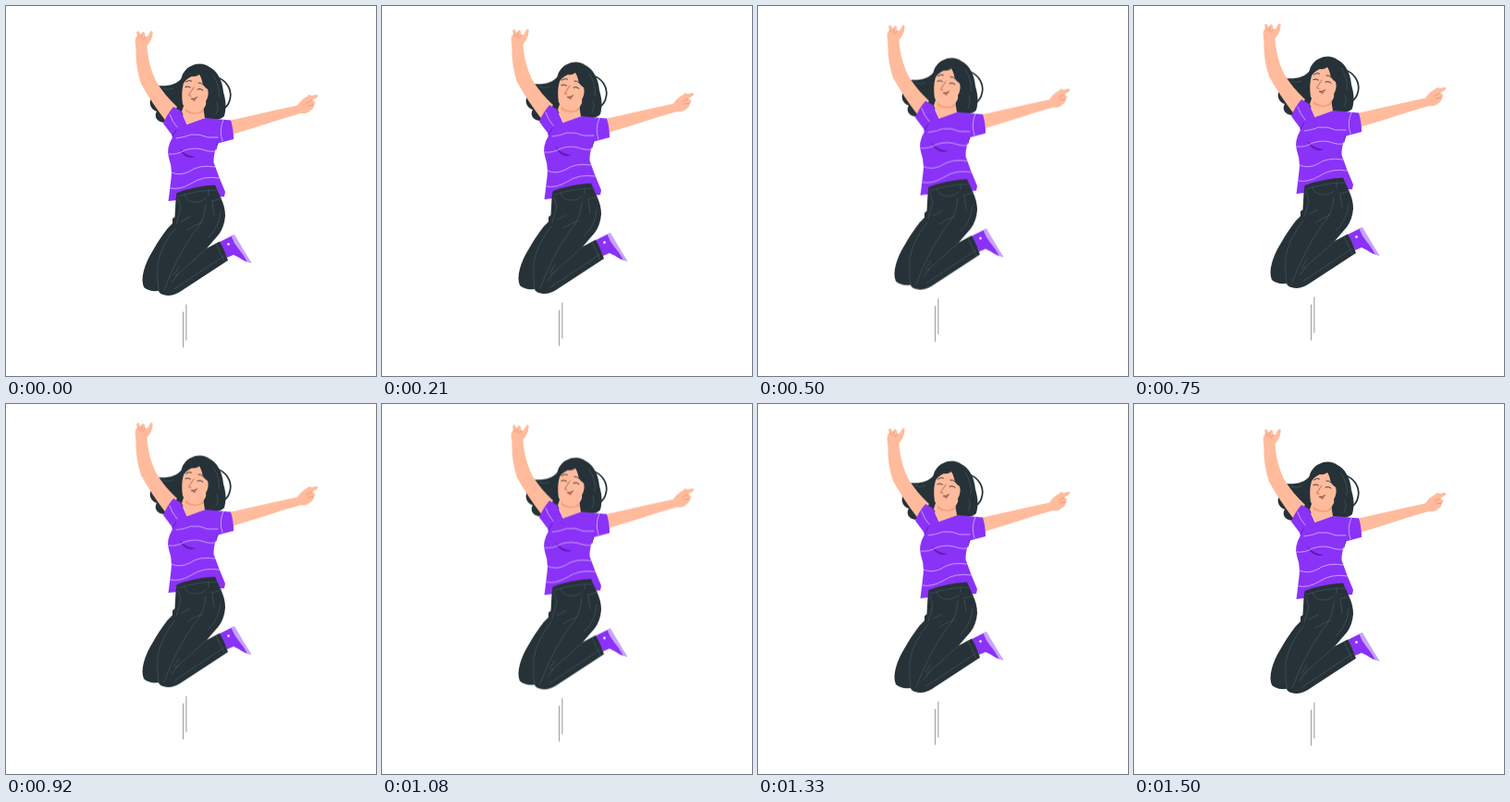
Animation of 400 by 400 pixels, one loop 1540 ms. Source, as an HTML page:

```html
<!DOCTYPE html>
<html lang="en">
<head>
<meta charset="utf-8">
<title>Jumping for joy</title>
<style>
  html, body { margin: 0; width: 100%; height: 100%; overflow: hidden; background: #fff; }
  svg { display: block; width: 100%; height: 100%; }
  .jump { animation: float 770ms cubic-bezier(.364, 0, .636, 1) -40ms infinite alternate; }
  @keyframes float { to { transform: translateY(-8px); } }
  .skin { fill: #ffbb9c; }
  .dark { fill: #263238; }
  .top { fill: #8a32f8; }
  .line { fill: none; stroke-linecap: round; stroke-linejoin: round; }
  .stripe { stroke: #e3cfff; stroke-width: .7; }
  .seam { stroke: #4b5d66; stroke-width: .6; }
  .fold { stroke: #5b1cad; stroke-width: .9; }
  .crease { stroke: #e88d72; stroke-width: .7; }
  .ink { stroke: #263238; stroke-width: .9; }
  .strand { stroke: #263238; stroke-width: 1.7; }
  .speed { stroke: #263238; stroke-width: .5; }
</style>
</head>
<body>
<svg viewBox="0 0 400 400">
  <g class="jump">
    <path class="line speed" d="M191.600 331V369M194.900 323V361"/>

    <!-- hair behind -->
    <path class="dark" d="M190 78C184 85 176 87 163 86C167 91 164 99 157 100C154 104 156 112 163 114C160 118 162 125 170 126L190 118L214 121C222 124 232 124 236 119C239 108 237 100 235 93C234 80 228 70 220 66C215 62 207 61 200 65C194 68 192 73 190 78Z"/>
    <path class="line strand" d="M228 77C238 80 244 90 242.500 99C241.500 105 239 109 235 111"/>

    <!-- shoe -->
    <path class="top" d="M231 255L246 247.500L265 277.500Q258 276.500 252 272L246 269L239 272Z"/>
    <path fill="#c9a3ff" d="M243.500 248.800L247 247L265.300 278L261 276.800Q257 269 251 262Q246 256 243.500 248.800Z"/>
    <circle cx="240.500" cy="257.500" r="1.300" fill="#fff"/>

    <!-- raised arm -->
    <path class="skin" d="M140.500 48L139.800 40Q139 35 142 32L141 29Q141.400 26.800 143.500 27.300L145.500 31L147 28.500Q149.600 27 150.200 30L150.500 33L153 33L156 27.500Q158.800 25.800 158.700 29Q158 37 152.500 43L153 50Q155 66 162 81Q171 96 185 109L174 126Q157 104 146 84Q140 66 140.500 48Z"/>
    <path class="line crease" d="M142.500 32l2 3M146 31l.8 4M150.500 33.500l-2.500 3"/>

    <!-- stretched arm -->
    <path class="skin" d="M241 124L292 112.500L315 107.500Q319 101 326 97.500Q328 95 330 97L336 95.800Q338.300 97 336.300 98.700L331 102L333 103Q335 105 333 107.200Q332.500 111 329 113Q325 117 319 116L300 121.500Q271 131 244 139Z"/>
    <path class="line crease" d="M331 102l-6 3M332.500 107l-6 1"/>

    <!-- shirt -->
    <path class="top" d="M181 109Q185 111 189 113.500L195.500 128L215 121L243 123.500Q246 133 246 144L229 148.500Q224 160 224.500 169Q230 185 237 201L236 206L184 210L175.500 211Q178 192 179 181Q179 172 176 164Q173 154 180 142L179 139L170 127Q174 117 181 109Z"/>
    <path class="line fold" d="M229 148l-2 7M180 141l4-7"/>
    <path fill="#5b1cad" d="M187 153Q193 162 205 163Q193 167 187 153Z"/>
    <g class="line stripe">
      <path d="M177 117Q179 124 185 131"/>
      <path d="M235 123Q230 134 234 146"/>
      <path d="M184 143Q193 142 200 139Q210 138 218 142L229 142"/>
      <path d="M176 160Q185 161 193 156Q205 152 215 156Q221 158 226 157"/>
      <path d="M179 180Q188 184 198 179Q209 171 226 174"/>
      <path d="M178 197Q188 199 200 192Q213 183 231 186"/>
    </g>

    <!-- trousers -->
    <path class="dark" d="M183.500 210L184.500 202Q202 195 226 193.500L232 207Q237 217 237 227Q236 239 230 247L217 262L231 254.500Q236 263 240 275L188 309Q178 315 170 312Q166 311 165 308Q154 309 149 304Q146 297 149 286Q152 275 159 264Q165 253 175 240L180 235L180 230L182.500 228Z"/>
    <g class="line seam">
      <path d="M186 206Q207 199 228 199"/>
      <path d="M193 204Q195 211 203 212Q213 212 217 207M222 211L233 208M223 212L225 226M219 199V205"/>
      <path d="M186 208L189 219L184 236"/>
      <path d="M216 214Q215 233 203 245Q184 272 171 307"/>
      <path d="M183 240Q167 260 164 280Q163 296 165 308"/>
      <path d="M217 262Q201 277 183 292M182 306Q209 288 236 270"/>
      <path d="M196 242Q204 237 212 234M189 233L199 228M181 291L187 282M179 299L186 290M227 257L236 276"/>
      <path d="M232 222Q231 239 218 251"/>
    </g>

    <!-- neck and face -->
    <path class="skin" d="M193 105L190 114L195.500 128Q204 125 215 121L213 109Z"/>
    <path fill="#f39b7d" d="M194 110Q204 119 213 110L214 114Q205 120 194 114Z"/>
    <path class="skin" d="M192 83Q197 74 207 73Q217 76 220 86Q220 98 216 107Q212 116 204 115.500Q195 114.500 191 106Q189 94 192 83Z"/>
    <path class="dark" d="M190 86Q187 74 198 66Q212 59 224 70Q232 79 234 101Q230 116 215 115Q217 107 216 103Q220 96 218 90Q212 86 212 81Q211 77 209 74Q205 77 201 76Q194 79 190 86Z"/>
    <g class="line ink">
      <path d="M194 87.500Q197 86 199.500 88M207 90Q210 88.500 213 91"/>
      <path d="M194.500 82Q197.500 79.500 200.500 81M208 83Q211 82.500 213 85"/>
    </g>
    <path class="line" stroke="#ae5c49" stroke-width=".8" d="M203 88Q199 94 197.500 96.500L200 97.500"/>
    <path class="line ink" d="M200.500 100.500Q204 101 206.500 98.800"/>
    <path fill="#e0604f" d="M201.500 101Q204 101.500 206 100Q205 103.300 203 103Q201.800 102.300 201.500 101Z"/>
    <path class="line seam" d="M224 75Q232 87 230 99M228 104Q231 111 227 117M181 89Q174 92 170 89"/>
  </g>
</svg>
</body>
</html>
```
